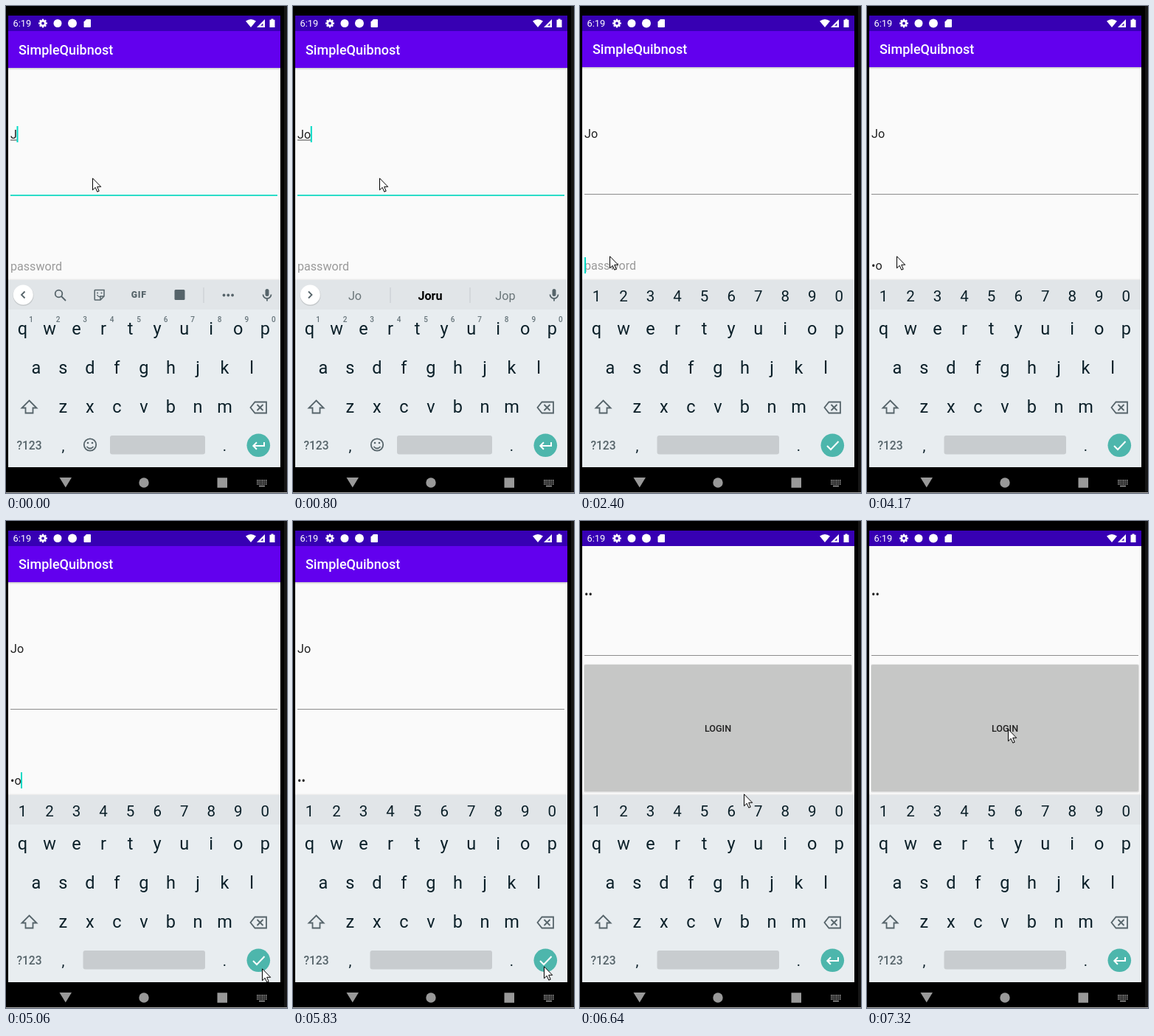
Recreate the animation shown at these times as an HTML page. Size 381x661 px, loop 8000 ms.

```html
<!DOCTYPE html>
<html lang="en">
<head>
<meta charset="utf-8">
<title>Login screen</title>
<style>
html, body { margin: 0; width: 100%; height: 100%; overflow: hidden; background: #000; }
svg { display: block; width: 381px; height: 661px; font-family: Roboto, Arial, sans-serif; }
.mid { text-anchor: middle; }
.key { font-size: 23.5px; fill: #0b2029; }
.num { font-size: 20.5px; fill: #0b2029; }
.hint { font-size: 10px; font-weight: 500; fill: #66747a; }
.field { font-size: 16.1px; fill: #212121; }
.sug { font-size: 16.2px; fill: #6a7579; }
.line { fill: none; stroke: #56646a; stroke-width: 1.8; }
.ink { fill: #56646a; }
</style>
</head>
<body>
<svg viewBox="0 0 381 661" xmlns="http://www.w3.org/2000/svg">
  <defs>
    <clipPath id="view"><rect x="3" y="34" width="369" height="592"/></clipPath>
    <linearGradient id="shade" x2="0" y2="1">
      <stop stop-color="#000" stop-opacity=".2"/><stop offset="1" stop-color="#000" stop-opacity="0"/>
    </linearGradient>
  </defs>
  <rect width="381" height="661"/>
  <rect x="377" width="4" height="661" fill="#161616"/>
  <rect y="660" width="381" height="1" fill="#aaa"/>

  <g clip-path="url(#view)">
    <rect x="3" y="34" width="369" height="592" fill="#fafafa"/>
    <g id="page">
      <rect x="3" y="34" width="369" height="50" fill="#6200ee"/>
      <rect x="3" y="84" width="369" height="3" fill="url(#shade)"/>
      <text x="17" y="66.3" font-size="18" font-weight="500" fill="#fff">SimpleQuibnost</text>
      <text id="user" class="field" x="6" y="180"></text>
      <rect id="compose" x="6" y="181.5" height="1" fill="#444"/>
      <rect id="rule" x="6" width="362"/>
      <text id="hint" class="field" x="6" y="359">password</text>
      <text id="pass" class="field" x="6" y="359"></text>
      <rect x="6" y="436" width="362" height="1" fill="#8c8c8c"/>
      <rect x="5" y="448.5" width="364" height="174" rx="2" fill="#dedede"/>
      <rect x="6" y="449" width="362" height="172" rx="2" fill="#c6c7c6"/>
      <text class="mid" x="187" y="540" font-size="12.6" font-weight="500" fill="#202020">LOGIN</text>
      <rect id="caret" width="2" height="22" fill="#03dac5"/>
    </g>
  </g>

  <rect x="3" y="13" width="369" height="21" fill="#3700b3"/>
  <g fill="#fff">
    <text x="9.5" y="28" font-size="12.8">6:19</text>
    <g id="gear"></g>
    <circle cx="70" cy="23.5" r="5.5"/>
    <circle cx="90" cy="23.5" r="6"/>
    <path d="M109 18h5a1 1 0 0 1 1 1v9a1 1 0 0 1-1 1h-7.500a1 1 0 0 1-1-1v-6.500z"/>
    <path d="M325 20.500q7-5 14 0L332 29z"/>
    <path d="M351 18v11h-11z"/>
    <path d="M348.500 23.500v3.300h-3.300z" fill="#3700b3"/>
    <path d="M359.500 17.500h3v1.200h2V29h-7V18.700h2z"/>
  </g>

  <rect x="3" y="372" width="369" height="254" fill="#e8edf0"/>
  <rect x="3" y="372" width="369" height="40" fill="#e1e5e8"/>
  <rect x="3" y="370.500" width="369" height="1.500" fill="#000" opacity=".06"/>
  <g id="keys"></g>
  <text class="mid" x="31.500" y="601.500" font-size="15.600" font-weight="500" fill="#56646a">?123</text>
  <text class="mid key" x="77.500" y="603.500" style="font-size:20px">,</text>
  <text class="mid key" x="296.500" y="603.500" style="font-size:20px">.</text>
  <path class="line" d="M31.500 535.500L41.500 545.500H36.500V552.500H26.500V545.500H21.500Z"/>
  <path class="line" d="M337.500 537.500H353V552.500H337.500L331.500 545Z M340.500 541l8 8m0-8l-8 8"/>
  <rect id="space" y="583" height="25.500" rx="3" fill="#c8cccf"/>
  <g id="smile">
    <circle class="line" cx="114" cy="595.500" r="8.200"/>
    <path class="line" d="M109.500 598q4.500 5 9 0" stroke-width="1.600"/>
    <circle class="ink" cx="111" cy="593" r="1.300"/><circle class="ink" cx="117" cy="593" r="1.300"/>
  </g>
  <circle cx="342.300" cy="596.300" r="15.800" fill="#4db6ac"/>
  <g fill="none" stroke="#fff" stroke-width="2">
    <path id="enter" d="M350 592v5h-14.500m4.500-4.700l-4.700 4.700l4.700 4.700"/>
    <path id="check" d="M335 597l5 5l10.500-11"/>
  </g>

  <g id="bar">
    <circle cx="23.500" cy="393" r="14" fill="#000" opacity=".12"/>
    <circle cx="23.300" cy="392" r="13.500" fill="#fff"/>
    <path id="chevron" class="line"/>
    <g id="mic">
      <rect class="ink" x="351.500" y="384" width="5" height="10" rx="2.500"/>
      <path class="line" d="M348.500 391.500a5.500 5.500 0 0 0 11 0M354 397v3.500" stroke-width="1.600"/>
    </g>
    <g id="tools">
      <circle class="line" cx="71.500" cy="390.500" r="4.800"/>
      <path class="line" d="M75 394l6 6"/>
      <path class="line" d="M121 385.500h12v8.500l-5 5h-7q-.8 0-.8-.8v-12q0-.7.8-.7M133 394h-5v5" style="stroke-width:1.500"/>
      <path class="line" d="M123.500 392q2.500 4 5 2" style="stroke-width:1.300"/>
      <circle class="ink" cx="124" cy="389.500" r="1"/><circle class="ink" cx="129.500" cy="389.500" r="1"/>
      <text class="mid ink" x="180.300" y="396.300" font-size="12.200" font-weight="900" letter-spacing=".8">GIF</text>
      <rect class="ink" x="228.500" y="385" width="14" height="14" rx="1.500"/>
      <rect x="267.500" y="382" width="1" height="21" fill="#c5cacd"/>
      <g class="ink"><circle cx="295.500" cy="392.500" r="1.900"/><circle cx="301.300" cy="392.500" r="1.900"/><circle cx="307.100" cy="392.500" r="1.900"/></g>
    </g>
    <g id="words" class="mid">
      <text class="sug" x="84" y="398.500">Jo</text>
      <text class="sug" x="186" y="398.500" font-weight="700" style="fill:#000">Joru</text>
      <text class="sug" x="288" y="398.500">Jop</text>
      <rect x="131.500" y="382" width="1" height="21" fill="#c5cacd"/>
      <rect x="239.500" y="382" width="1" height="21" fill="#c5cacd"/>
    </g>
  </g>
  <g id="digits"></g>

  <g fill="#999">
    <path d="M72.500 640h16.500l-8.200 13.500z"/>
    <circle cx="187" cy="647" r="6.700"/>
    <rect x="286.500" y="640.300" width="13.500" height="13.500"/>
    <g id="dots"></g>
  </g>
  <path id="mouse" d="M.5.8V16.800L4.200 13.300L6.800 19.200L9.200 18.200L6.700 12.300H11.700Z" fill="#fff" stroke="#000"/>
</svg>
<script>
const $ = id => document.getElementById(id);
const NS = 'http://www.w3.org/2000/svg';
const LOOP = 8000;

function add(parent, tag, attrs, text) {
  const el = document.createElementNS(NS, tag);
  for (const k in attrs) el.setAttribute(k, attrs[k]);
  if (text) el.textContent = text;
  $(parent).append(el);
}
const label = (parent, cls, x, y, s) => add(parent, 'text', { class: 'mid ' + cls, x, y }, s);

const STEP = 36.53;
[['qwertyuiop', 22.5, 446], ['asdfghjkl', 40.8, 498.5], ['zxcvbnm', 77.3, 552]].forEach(([row, x, y]) =>
  [...row].forEach((c, i) => label('keys', 'key', x + i * STEP, y, c)));
[...'1234567890'].forEach((c, i) => {
  label('bar', 'hint', 34 + i * STEP, 428.5, c);
  label('digits', 'num', 22.5 + i * STEP, 400.5, c);
});
for (let i = 0; i < 8; i++)
  add('gear', 'rect', { x: 48.8, y: 17.6, width: 2.4, height: 3, transform: `rotate(${i * 45} 50 23.5)` });
add('gear', 'circle', { cx: 50, cy: 23.5, r: 3.2, fill: 'none', stroke: '#fff', 'stroke-width': 2.6 });
for (let r = 0; r < 3; r++)
  for (let c = 0; c < 6; c++)
    add('dots', 'rect', { x: 340 + c * 2.4, y: 643 + r * 2.5, width: 1.6, height: 1.6 });
add('dots', 'rect', { x: 343, y: 650.8, width: 8, height: 1.6 });

// Each step changes only the listed values. caret: [x, y] or null; at: pointer tip.
const steps = [
  [0, { at: [117, 233], user: 'J', pass: '', caret: [14.5, 163], pan: 0, focus: 'user', bar: 'tools', tint: '#9a9a9a', done: false }],
  [280, { caret: null }],
  [680, { user: 'Jo', caret: [23.8, 163] }],
  [800, { bar: 'words' }],
  [1170, { at: [106, 249], caret: null }],
  [1290, { at: [76, 294] }],
  [1410, { at: [50, 338] }],
  [1530, { at: [41, 353] }],
  [1650, { at: [40, 339], caret: [23.8, 163] }],
  [1900, { tint: '#707070' }],
  [2160, { focus: 'pass', caret: [6, 342], tint: '#9a9a9a' }],
  [2280, { pan: 1, bar: 'digits', done: true }],
  [2650, { caret: null }],
  [3020, { pass: 'j', caret: [10, 342] }],
  [3550, { caret: null }],
  [3670, { pass: '•o', caret: [20, 342] }],
  [4170, { caret: null }],
  [4450, { at: [92, 384] }],
  [4570, { at: [215, 488] }],
  [4690, { at: [325, 583], caret: [20, 342] }],
  [4810, { at: [361, 614] }],
  [5060, { at: [347, 607] }],
  [5180, { at: [340, 604], pass: '••', caret: null }],
  [5710, { caret: [16.5, 342] }],
  [5830, { caret: null }],
  [5950, { pan: 250, done: false }],
  [6070, { pan: 254 }],
  [6490, { at: [304, 498] }],
  [6640, { at: [222, 370] }],
  [6760, { at: [169, 286] }],
  [6900, { at: [179, 277] }],
  [7020, { at: [187, 271] }],
  [7170, { at: [190, 282] }],
  [7320, { at: [191, 282] }]
];
const states = [];
steps.reduce((prev, [time, change]) => {
  const s = { ...prev, ...change };
  states.push([time, s]);
  return s;
}, {});

const show = (id, on) => $(id).style.display = on ? '' : 'none';
const set = (id, attrs) => { for (const k in attrs) $(id).setAttribute(k, attrs[k]); };

function draw(s) {
  const digits = s.bar === 'digits', inUser = s.focus === 'user';
  set('page', { transform: `translate(0 ${-s.pan})` });
  set('mouse', { transform: `translate(${s.at})` });
  $('user').textContent = s.user;
  $('pass').textContent = s.pass;
  show('hint', !s.pass);
  $('hint').style.fill = s.tint;
  show('compose', inUser);
  set('compose', { width: s.user.length > 1 ? 18 : 9 });
  set('rule', inUser ? { y: 256, height: 2, fill: '#2bdcc8' } : { y: 256, height: 1, fill: '#8c8c8c' });
  show('caret', s.caret);
  if (s.caret) set('caret', { x: s.caret[0], y: s.caret[1] });
  show('bar', !digits);
  show('digits', digits);
  show('tools', s.bar === 'tools');
  show('words', s.bar === 'words');
  set('chevron', { d: s.bar === 'tools' ? 'M25.500 387.500l-4.500 4.500l4.500 4.500' : 'M21 387.500l4.500 4.500l-4.500 4.500' });
  show('smile', !digits);
  set('space', digits ? { x: 104.5, width: 165.5 } : { x: 141, width: 129 });
  show('check', s.done);
  show('enter', !s.done);
}

let last, start;
function tick(now) {
  start ??= now;
  const t = (now - start) % LOOP;
  let cur;
  for (const [time, s] of states) if (time <= t) cur = s;
  if (cur !== last) draw(last = cur);
  requestAnimationFrame(tick);
}
draw(last = states[0][1]);
requestAnimationFrame(tick);
</script>
</body>
</html>
```
